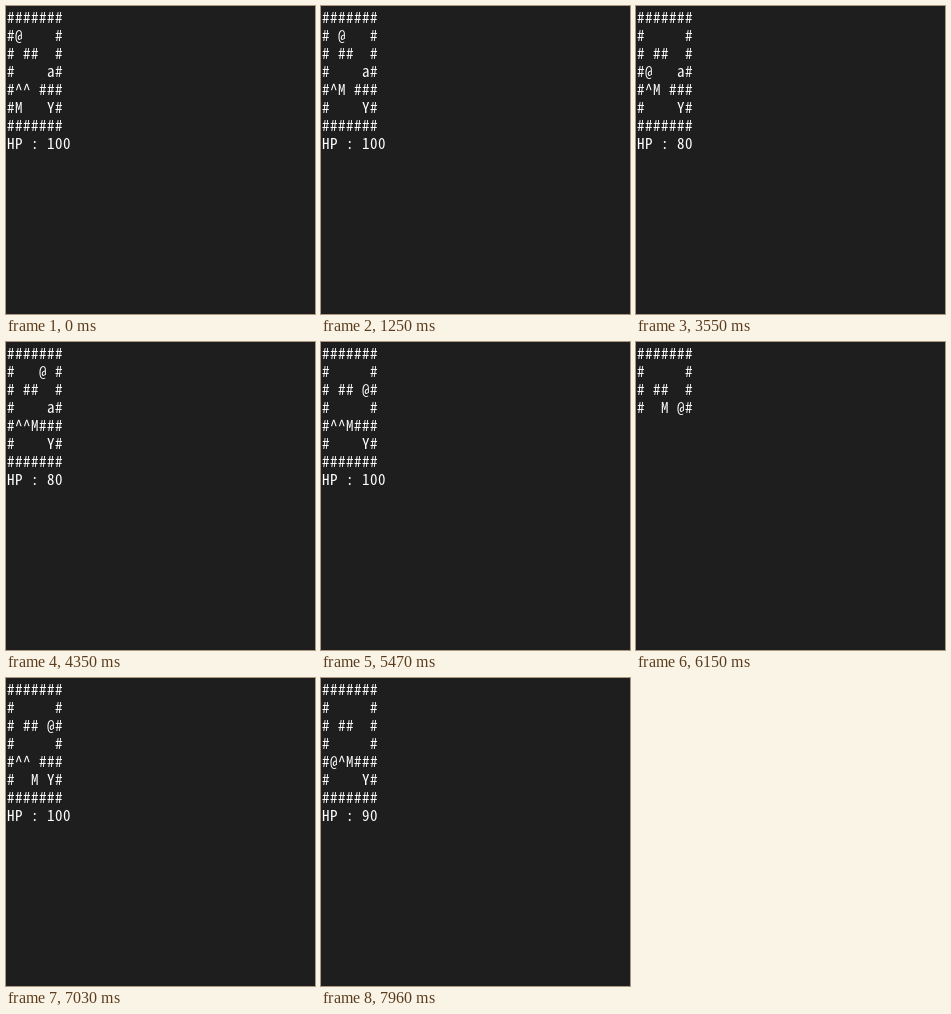
Animation of 309 by 308 pixels, one loop 8000 ms. Source, as an HTML page:

```html
<!DOCTYPE html>
<html lang="en">
<head>
<meta charset="utf-8">
<title>Text dungeon</title>
<style>
html, body { margin: 0; width: 100%; height: 100%; overflow: hidden; background: #1e1e1e; }
svg { display: block; width: 309px; height: 308px; }
text { font: 15px "Noto Sans Mono CJK JP", "Noto Sans Mono CJK SC", "Noto Sans Mono", monospace; fill: #fff; white-space: pre; }
</style>
</head>
<body>
<svg id="screen" viewBox="0 0 309 308"></svg>
<script>
const LOOP = 8000, CELL = 8, LINE = 18;
const MAP = ["#######", "#     #", "# ##  #", "#    a#", "#^^ ###", "#    Y#", "#######"];
const STEP = { u: [-1, 0], d: [1, 0], l: [0, -1], r: [0, 1] };

// time, moves (piece + direction), rows printed so far if the redraw is unfinished
const EVENTS = [
  [530, "Mu"], [990, "Mr"], [1250, "@r"], [1520, "Md"],
  [1920, "@l"], [2050, "Mr"], [2120, "@d"], [2250, "@d"], [2380, "@d"],
  [2610, "@u"], [2940, "@u"], [3010, "Ml"], [3210, "@d"],
  [3410, "@d"], [3480, "Mu"], [3550, "@u"], [3680, "@u"], [3810, "@u"],
  [4010, "@r Mr"], [4210, "@r"], [4340, "@r"], [4470, "@r", 4], [4540, ""],
  [4610, "@d"], [4740, "@d"], [5000, "Mu"], [5200, "@u"],
  [5470, "Md"], [5540, "@d"], [5610, "", 4], [5680, ""],
  [6010, "Mu", 4], [6080, ""], [6150, "", 4], [6220, ""],
  [6420, "@u"], [6490, "Md"], [6620, "@d", 4], [6690, ""],
  [6890, "@u"], [6960, "Md", 4], [7030, ""],
  [7360, "@d"], [7490, "@l"], [7560, "", 2], [7630, "@l Mu"],
  [7760, "@l"], [7890, "@l"], [7960, "@d"]
];

const screen = document.getElementById("screen");
const columns = Array.from({ length: 8 }, (_, i) => 1 + i * CELL).join(" ");
const lines = Array.from({ length: 8 }, (_, i) => {
  const line = document.createElementNS("http://www.w3.org/2000/svg", "text");
  line.setAttribute("x", columns);
  line.setAttribute("y", 17 + i * LINE);
  return screen.appendChild(line);
});

function play(time) {
  const grid = MAP.map(row => [...row]);
  const pieces = { "@": [1, 1], M: [5, 1] };
  let hp = 100, shown = 8;
  for (const [at, moves, rows = 8] of EVENTS) {
    if (at > time) break;
    shown = rows;
    for (const [who, way] of moves.split(" ").filter(Boolean)) {
      const pos = pieces[who];
      pos[0] += STEP[way][0];
      pos[1] += STEP[way][1];
      if (who !== "@") continue;
      const tile = grid[pos[0]][pos[1]];
      if (tile === "^") hp -= 10;
      if (tile === "a") {
        hp += 20;
        grid[pos[0]][pos[1]] = " ";
      }
    }
  }
  for (const who in pieces) grid[pieces[who][0]][pieces[who][1]] = who;
  return [...grid.map(row => row.join("")), "HP : " + hp].slice(0, shown);
}

function draw(now) {
  const rows = play(now % LOOP);
  lines.forEach((line, i) => {
    const text = rows[i] || "";
    if (line.textContent !== text) line.textContent = text;
  });
  requestAnimationFrame(draw);
}
draw(0);
</script>
</body>
</html>
```
